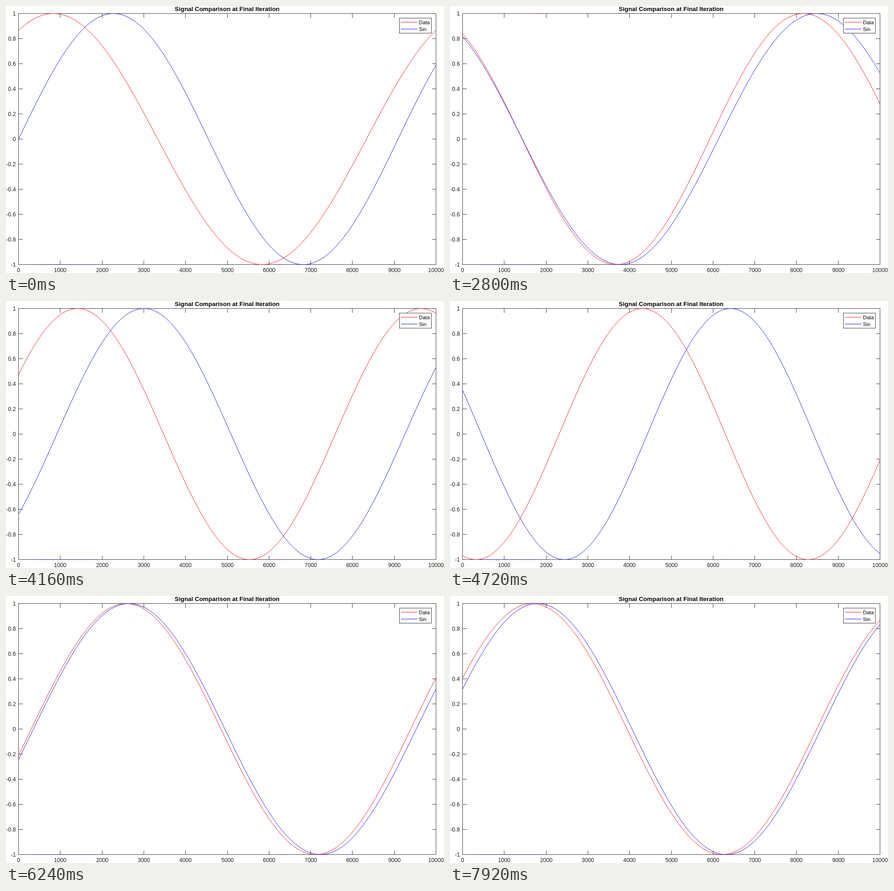
Recreate the animation shown at these times as an HTML page. Size 958x585 px, loop 8 s.

```html
<!DOCTYPE html>
<html lang="en">
<head>
<meta charset="utf-8">
<title>Signal Comparison</title>
<style>
  html, body { margin: 0; height: 100%; overflow: hidden; background: #fff; }
  svg { display: block; width: 100vw; height: 100vh; }
  text { font: 12.2px "Liberation Sans", Arial, sans-serif; fill: #1c1c1c; }
  .title { font-size: 13.4px; font-weight: bold; fill: #000; }
  .key { font-size: 11.2px; fill: #000; }
  .axis { fill: none; stroke: #404040; shape-rendering: crispEdges; }
  .curve { fill: none; stroke-width: 0.9; }
</style>
</head>
<body>
<svg id="stage" viewBox="0 0 958 585"></svg>
<script>
const STEP_MS = 80, BLOCKS = 100, TAU = 2 * Math.PI;
const LEFT = 27.5, RIGHT = 940.5, TOP = 16.5, BOTTOM = 566.5;
const WIDTH = RIGHT - LEFT, MIDDLE = (TOP + BOTTOM) / 2, AMPLITUDE = (BOTTOM - TOP) / 2;
const RED = '#ff0000', BLUE = '#0000ff';
const stage = document.getElementById('stage');

function add(tag, attributes, content = '') {
  const node = document.createElementNS('http://www.w3.org/2000/svg', tag);
  for (const name in attributes) node.setAttribute(name, attributes[name]);
  node.textContent = content;
  return stage.appendChild(node);
}
const label = (content, x, y, anchor, cls = '') =>
  add('text', { x, y, 'text-anchor': anchor, class: cls }, content);
const line = (d, stroke) => add('path', { d, stroke, class: 'curve' });

// Phase of the input in cycles; time is counted in blocks of 10000 samples.
// Constant tone, then a rising chirp, then a constant tone again.
function dataPhase(t) {
  const third = BLOCKS / 3;
  if (t < third) return 1 / 6 + t;
  if (t < 2 * third) {
    const u = t - third;
    return 0.5 + 1.1 * u + 0.003 * u * u;
  }
  return 0.5 + 1.1 * (t - 2 * third);
}

// Phase-locked loop: each block's quadrature phase error sets the next frequency.
function trackPhase() {
  const CENTRE = 1.0971, GAIN = 0.5825, SAMPLES = 400;
  const blocks = [];
  let phase = 0, frequency = 1.1;
  for (let n = 0; n < BLOCKS; n++) {
    blocks.push({ phase, frequency });
    let inPhase = 0, quadrature = 0;
    for (let i = 0; i < SAMPLES; i++) {
      const t = (i + 0.5) / SAMPLES;
      const data = Math.sin(TAU * dataPhase(n + t));
      const angle = TAU * (phase + frequency * t);
      inPhase += data * Math.sin(angle);
      quadrature += data * Math.cos(angle);
    }
    phase += frequency;
    frequency = CENTRE + GAIN * Math.atan2(quadrature, inPhase) / TAU;
  }
  return blocks;
}

function wave(phaseAt) {
  const points = [];
  for (let i = 0; i <= 300; i++) {
    const t = i / 300;
    const y = MIDDLE - AMPLITUDE * Math.sin(TAU * phaseAt(t));
    points.push((LEFT + WIDTH * t).toFixed(2) + ' ' + y.toFixed(3));
  }
  return 'M' + points.join('L');
}

// Axes
let axes = `M${LEFT} ${TOP}H${RIGHT}V${BOTTOM}H${LEFT}Z`;
for (let i = 0; i <= 10; i++) {
  const x = Math.round(LEFT - 0.5 + WIDTH * i / 10) + 0.5;
  const y = TOP + 55 * i;
  axes += `M${x} ${TOP}v9M${x} ${BOTTOM}v-9M${LEFT} ${y}h9M${RIGHT} ${y}h-9`;
  label(i * 1000, x, 583.3, 'middle');
  label((5 - i) / 5, 21.5, y + 4.5, 'end');
}
add('path', { d: axes, class: 'axis' });
label('Signal Comparison at Final Iteration', 483.7, 11, 'middle', 'title');

// Tinted stretches of the frame
line('M175 16.5h9M590 566.5h8', '#8c1a1a');
line('M187 16.5h9M62 566.5h138M600 566.5h8', '#1a1a8c');

const dataCurve = line('', RED);
const sinCurve = line('', BLUE);

// Legend
add('rect', { x: 860.5, y: 26.5, width: 70, height: 33, class: 'axis', style: 'fill:#fff' });
line('M864 35.5h36', RED);
line('M864 50.5h36', BLUE);
label('Data', 903.3, 39.7, 'start', 'key');
label('Sin', 903.3, 54.5, 'start', 'key');

const tracked = trackPhase();
let shown = -1;
function draw(now) {
  const n = Math.floor(now / STEP_MS) % BLOCKS;
  if (n !== shown) {
    shown = n;
    const { phase, frequency } = tracked[n];
    dataCurve.setAttribute('d', wave(t => dataPhase(n + t)));
    sinCurve.setAttribute('d', wave(t => phase + frequency * t));
  }
  requestAnimationFrame(() => draw(performance.now()));
}
draw(performance.now());
</script>
</body>
</html>
```
